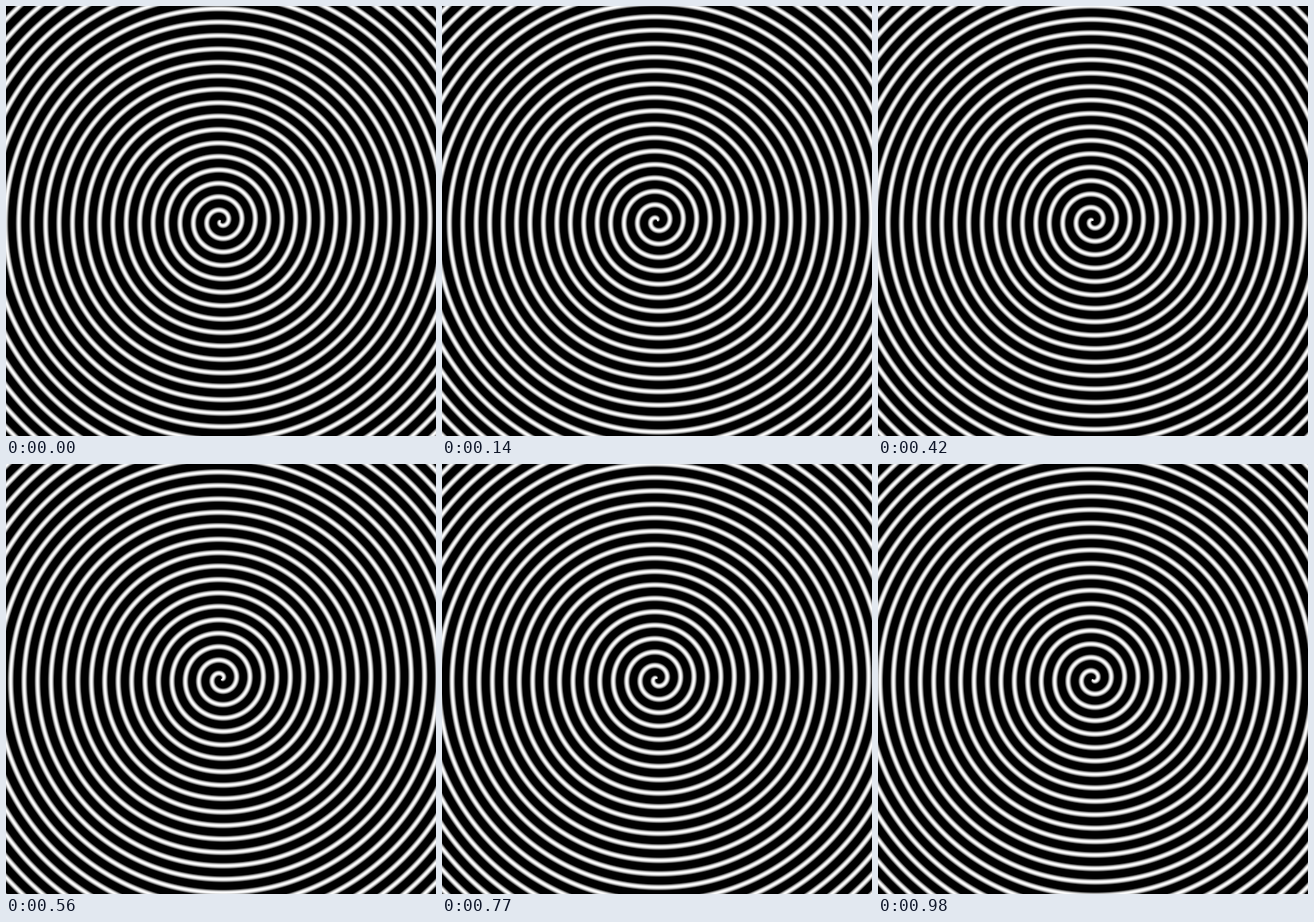
Animation, 600 px wide and 600 px high, one loop 1.05 s. Source, as an HTML page with a canvas:

```html
<!DOCTYPE html>
<html lang="en">
<head>
<meta charset="utf-8">
<title>Spiral</title>
<style>
  html, body { margin: 0; width: 100%; height: 100%; overflow: hidden; background: #000; }
  canvas { display: block; width: 600px; height: 600px; }
</style>
</head>
<body>
<canvas id="stage" width="600" height="600"></canvas>
<script>
const SIZE = 600, PITCH = 18.75, STEP_MS = 70, STEPS = 5, TURN = 2 * Math.PI;
const ctx = document.getElementById('stage').getContext('2d');

// Archimedean spiral shaded as the positive half of a cosine wave
function spiral(step) {
  const img = ctx.createImageData(SIZE, SIZE);
  const px = new Uint32Array(img.data.buffer);
  for (let y = 0, i = 0; y < SIZE; y++) {
    for (let x = 0; x < SIZE; x++, i++) {
      const dx = x + 0.5 - SIZE / 2, dy = SIZE / 2 - y - 0.5;
      const phase = TURN * (Math.hypot(dx, dy) / PITCH - 0.55 - step / STEPS) - Math.atan2(dy, dx);
      const v = Math.round(255 * Math.max(0, Math.cos(phase)));
      px[i] = 0xff000000 | v << 16 | v << 8 | v;
    }
  }
  return img;
}

const poses = Array.from({ length: STEPS }, (_, i) => spiral(i));
const start = performance.now();
let shown = -1;

function draw() {
  const step = Math.floor(Math.max(0, performance.now() - start) / STEP_MS) % STEPS;
  if (step !== shown) ctx.putImageData(poses[shown = step], 0, 0);
  requestAnimationFrame(draw);
}
draw();
</script>
</body>
</html>
```
